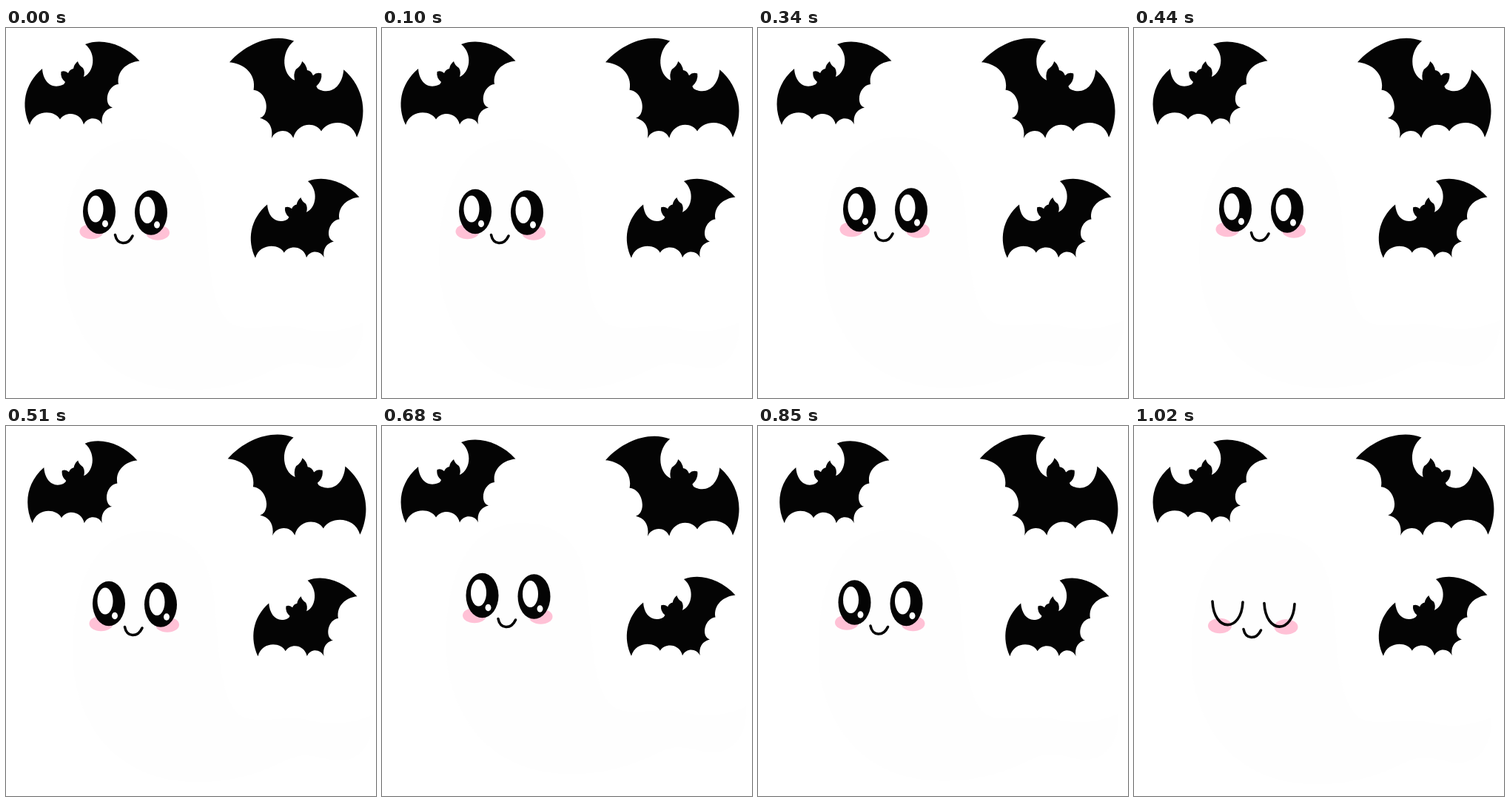
An HTML page for the animation above (1190 ms loop, 500x500 px).

```html
<!DOCTYPE html>
<html lang="en">
<head>
<meta charset="utf-8">
<title>Ghost and bats</title>
<style>
html, body { margin: 0; width: 100%; height: 100%; overflow: hidden; background: #fff; }
svg { display: block; width: 100%; height: 100%; }
</style>
</head>
<body>
<svg viewBox="0 0 500 500" xmlns="http://www.w3.org/2000/svg">
  <defs>
    <path id="bat" fill="#040404" d="M180.500 44.500
      C164 46 149 58 152 76 C140 77 133 94 139 104 Q141 107 144 107.500
      C133 110 128 119 130 130.500 C126 120 110 119 105 130.500
      C101 113 80 112 73 123.500 C66 110 38 110 32 131
      C20 106 24 76 49 55 C50 72 61 83 76 77
      Q79 76 80 73 Q73 67 74.500 59 Q80 57 84 61 Q86 56 91 55
      Q92 49 97 45 Q98 50 104 54 Q107 59 105 66
      C119 60 123 35 107 22 C130 13 160 22 180.500 44.500Z"/>
    <g id="eye">
      <ellipse rx="22" ry="30.300" fill="#040404"/>
      <ellipse cx="-5" cy="-3.500" rx="10.500" ry="18" fill="#fff"/>
      <ellipse cx="8" cy="16.500" rx="4" ry="4.700" fill="#fff"/>
    </g>
    <path id="lid" d="M-20.500 -6C-18.500 36 18.500 36 20.500 -5"/>
  </defs>
  <g id="ghost">
    <path fill="#fefefe" d="M180 150C235 150 262 185 268 240C275 310 275 380 305 400
      C330 412 365 398 395 405C430 414 455 410 483 398C484 440 462 464 430 460
      C405 455 390 448 365 460C320 482 285 490 240 489C150 487 95 430 80 350
      C70 270 85 150 180 150Z"/>
    <g fill="#ffc1d6">
      <ellipse cx="115.500" cy="275" rx="16" ry="10.300"/>
      <ellipse cx="205" cy="276.500" rx="16" ry="10.300"/>
    </g>
    <g id="open">
      <use href="#eye" x="126" y="248"/>
      <use href="#eye" x="196" y="249.500"/>
    </g>
    <g fill="none" stroke="#040404" stroke-width="3.600" stroke-linecap="round">
      <g id="shut">
        <use href="#lid" x="126" y="248"/>
        <use href="#lid" x="196" y="250.500"/>
      </g>
      <path d="M147.500 279.500C150 294 165 294 171 281"/>
    </g>
  </g>
  <use href="#bat" id="left"/>
  <use href="#bat" id="right"/>
  <use href="#bat" id="low"/>
</svg>
<script>
const STEP = 170;
const drift = [[0, 0], [6, 0], [11, -3], [13, -8], [9.5, -19], [4.5, -9.5], [0.5, -5]];
const last = drift.length - 1;
const el = id => document.getElementById(id);

// Wing poses as affine matrices: spread and folded.
const flat = 'matrix(1 0 0 1 0 0)';
const fold = 'matrix(.96 .006 .01 .992 3.7 1.2)';
const place = {
  left: '',
  right: 'matrix(-1.176 .02 -.03 1.21 515.6 -11.3)',
  low: 'matrix(.946 0 0 .952 306.7 186.1)'
};
const widen = 'matrix(1.027 0 .02 1.008 -11.4 -2.2)';

function draw(ms) {
  const i = Math.floor(ms / STEP) % drift.length;
  const odd = i % 2 === 1;
  const asleep = i === last;
  const pose = odd ? fold : flat;

  el('left').setAttribute('transform', pose);
  el('low').setAttribute('transform', `${place.low} ${pose}`);
  el('right').setAttribute('transform', `${odd || asleep ? widen : flat} ${place.right}`);

  el('ghost').setAttribute('transform', `translate(${drift[i]})`);
  el('open').setAttribute('display', asleep ? 'none' : 'inline');
  el('shut').setAttribute('display', asleep ? 'inline' : 'none');
}

const start = performance.now();
function tick() {
  draw(performance.now() - start);
  requestAnimationFrame(tick);
}
tick();
</script>
</body>
</html>
```
